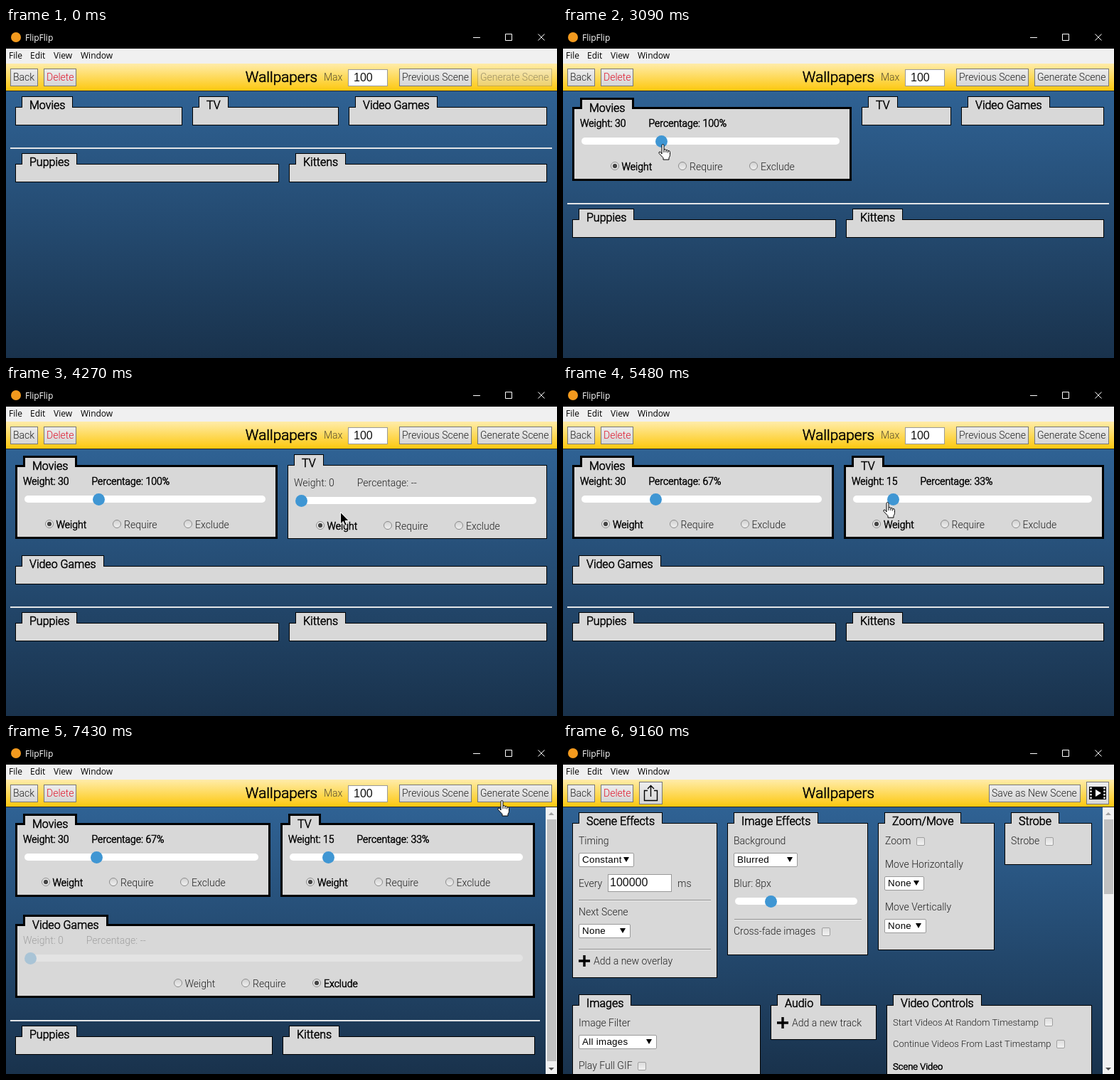
An HTML page for the animation above (9.21 s loop, 775 px wide and 464 px high).

```html
<!DOCTYPE html>
<html lang="en">
<head>
<meta charset="utf-8">
<title>Scene generator</title>
<style>
html, body { margin: 0; width: 100%; height: 100%; overflow: hidden; background: #000; }
#stage { position: relative; width: 775px; height: 464px; overflow: hidden; color: #222;
  font: 300 14px/20px Roboto, sans-serif; background: linear-gradient(#2f6294 89px, #19324c); }
#stage div, #stage svg, #stage span.t { position: absolute; box-sizing: border-box; }
.t { white-space: pre; }
.b { color: #000; -webkit-text-stroke: .6px #000; }
.gap { margin-left: 32px; }
.title { left: 0; width: 775px; text-align: center; font-size: 20.8px; }
.ui { font: 12px/20px "Open Sans", "Noto Sans", sans-serif; color: #000; }
.arial { font: 16px/20px "Liberation Sans", Arial, sans-serif; color: #111; }
.pick { font: 13.33px/18px "Liberation Sans", Arial, sans-serif; color: #000; letter-spacing: .3px;
  padding-left: 4px; background: #fff; border: 1px solid #9a9a9a; border-radius: 2px; }
.pick i { position: absolute; right: 6px; top: 5px; width: 8px; height: 7px; background: #000;
  clip-path: polygon(0 0, 100% 0, 50% 100%); }
.bar { left: 0; top: 50px; width: 775px; height: 39px; border-bottom: 1px solid #2a2a2a;
  background: linear-gradient(#ffecaa, #fdc80f); }
.btn { background: linear-gradient(#ededed, #d6d6d6); border: 1px solid #777; }
.field { background: #fff; border: 1px solid #999; }
.box, .tab { background: #d8d8d8; border: 1px solid #000; }
.tab { left: 8px; top: -16px; height: 16px; padding: 2px 10px 0; border-bottom: 0;
  font-size: 16px; line-height: 19px; white-space: pre; }
.thick, .thick .tab { border-width: 3px; }
.track { height: 10px; border-radius: 5px; background: #fff; }
.knob { width: 17px; height: 17px; border-radius: 50%; background: #3f96d3; }
.radio { width: 12px; height: 12px; border: 1px solid #8c8c8c; border-radius: 50%;
  background: linear-gradient(#d2d2d2, #f0f0f0); }
.on { background: radial-gradient(#444 0 2.8px, #e4e4e4 3.5px); }
.check { width: 12px; height: 12px; border: 1px solid #a0a0a0; border-radius: 2px;
  background: linear-gradient(#ddd, #f2f2f2); }
.faded { opacity: .3; }
</style>
</head>
<body>
<div id="stage">
  <div id="view"></div>
  <div id="cursor" style="left:0;top:0">
    <svg id="arrow" width="14" height="21" viewBox="0 0 14 21"><path d="M.5 .5V17l3.8-3.6 2.5 6 2.6-1.1-2.5-5.8h5.3z" fill="#000" stroke="#fff"/></svg>
    <svg id="hand" style="left:-6px" width="18" height="23" viewBox="0 0 18 23"><path d="M5 14V2.5q0-2 1.5-2t1.5 2V8q2.7-1.3 3 .8 2.4-1 2.7.9 2.8-.7 2.8 1.8v4q0 2-1.5 4v2.6H7v-2.5L1.2 13.4q-1-2 1-2.4 1.3 0 2.8 3zM8 8v4M11 9v3M13.7 10v2.500" fill="#fff" stroke="#000"/></svg>
  </div>
</div>
<script>
const LOOP = 9210, STEP = 60;
const OPEN_MOVIES = 910, SLIDE = 1690, RELEASE = 3090, OPEN_TV = 3800, SET_TV = 4510,
  OPEN_GAMES = 6190, EXCLUDE = 7010, GENERATE = 8190;

// start, steps, x, y, hand at the end
const moves = [
  [430, 6, 60, 120, 1], [OPEN_MOVIES, 11, 127, 158, 0], [SLIDE, 6, 146, 163, 1],
  [2360, 5, 139, 163, 1], [RELEASE, 10, 440, 118, 1], [OPEN_TV, 8, 470, 177, 0],
  [4330, 7, 464, 161, 1], [5370, 12, 58, 253, 1], [OPEN_GAMES, 12, 439, 337, 1],
  [EXCLUDE, 8, 697, 79, 1], [7490, 7, 700, 74, 1], [8620, 9, 795, 110, 0]
];

// from, then left and width of Movies, TV and Video Games
const layouts = [
  [0, 13, 235, 262, 206, 482, 279], [OPEN_MOVIES, 13, 390, 417, 128, 559, 202],
  [SLIDE, 13, 393, 420, 126, 560, 201], [OPEN_TV, 13, 369, 396, 365, 13, 748],
  [SET_TV, 13, 368, 395, 366, 13, 748], [OPEN_GAMES, 13, 359, 386, 358, 13, 731]
];

const $ = id => document.getElementById(id);
const ease = p => p < .5 ? 4 * p ** 3 : 1 - 4 * (1 - p) ** 3;
const el = (cls, x, y, w, h, inner = "", style = "") =>
  `<div class="${cls}" style="left:${x}px;top:${y}px;width:${w}px;height:${h}px;${style}">${inner}</div>`;
const text = (x, y, s, cls = "", style = "") =>
  `<span class="t ${cls}" style="left:${x}px;top:${y - 10}px;${style}">${s}</span>`;
const svg = (x, y, w, h, body) =>
  `<svg style="left:${x}px;top:${y}px" width="${w}" height="${h}" fill="none" stroke="#000">${body}</svg>`;
const fill = (x, y, w, h, color) => el("", x, y, w, h, "", `background:${color}`);

const button = (x, w, s, style = "") =>
  el("btn", x, 57, w, 25, "", style) + text(x + 4, 69, s, "", style);
const box = (x, y, w, h, name, thick) =>
  el("box" + (thick ? " thick" : ""), x, y, w, h, `<div class="tab b">${name}</div>`);
const slider = (x, y, w, part) =>
  el("track", x, y - 5, w, 10) + el("knob", x + 8 + part * (w - 16) - 8.5, y - 8.5, 17, 17);
const check = (x, y) => el("check", x - 6, y - 6, 12, 12);
const pick = (x, y, w, s) => el("pick", x, y, w, 20, s + "<i></i>");
const rule = (x, y, w) => fill(x, y, w, 1, "#8e8e8e") + fill(x, y + 1, w, 1, "#eee");
const plus = (x, y) => svg(x - 8, y - 8, 16, 16, `<path d="M8 0V16M0 8H16" stroke-width="3.400"/>`);

function chrome() {
  return fill(0, 0, 775, 29, "#000") + el("", 7, 6, 14, 14, "", "border-radius:50%;background:#f39a1e") +
    text(27, 14, "FlipFlip", "ui", "color:#fff") +
    svg(650, 5, 115, 17, `<path d="M7 8.500H17M52.500 3.500h9v9h-9zM98.500 3.500l9 9m0-9l-9 9" stroke="#fff"/>`) +
    fill(0, 29, 775, 21, "#f0f0f0") +
    [[4, "File"], [34, "Edit"], [67, "View"], [105, "Window"]].map(([x, s]) => text(x, 39, s, "ui")).join("") +
    `<div class="bar"></div>` + button(6, 39, "Back") + button(53, 46, "Delete", "color:#e0182d") +
    `<div class="title b" style="top:59px">Wallpapers</div>`;
}

function scrollbar(h) {
  return fill(759, 89, 16, 375, "#f1f1f1") + fill(761, 106, 13, h, "#c1c1c1") +
    svg(759, 89, 16, 375, `<path d="M4 11l4-4 4 4z" fill="#a3a3a3" stroke="none"/><path d="M4 366l4 4 4-4z" fill="#505050" stroke="none"/>`);
}

// mode: 0 weight, 2 exclude
function weightGroup(x, y, w, name, { open, weight = 0, percent = "--", mode = 0 }) {
  const thick = weight > 0 || mode > 0, d = thick ? 2 : 0;
  let out = box(x, y, w, open ? 104 : 26, name, thick);
  if (!open) return out;
  const values = text(x + 9 + d, y + 25 - d,
    `Weight: ${weight}<span class="gap">Percentage: ${percent}</span>`, weight ? "b" : "") +
    slider(x + 11 + d, y + 50 - d, w - 26 - 2 * d, weight / 100);
  out += mode ? `<div class="faded" style="left:0;top:0">${values}</div>` : values;
  const mid = x + w / 2;
  [[-137, "Weight"], [-41.5, "Require"], [58.5, "Exclude"]].forEach(([dx, s], i) => {
    const on = i === mode;
    out += el("radio" + (on ? " on" : ""), Math.round(mid + dx - 6), y + 79 - d, 12, 12) +
      text(mid + dx + 10, y + 86 - d, s, on ? "b" : "");
  });
  return out;
}

function generator(t, cx) {
  const [, mx, mw, tx, tw, gx, gw] = layouts.findLast(l => t >= l[0]);
  const tvSet = t >= SET_TV, scroll = t >= OPEN_GAMES, wrapped = t >= OPEN_TV;
  const weight = t < SLIDE ? 0 : t < RELEASE ? Math.round((cx - 34) / 3.47) : 30;
  const hr = scroll ? 389 : wrapped ? 311 : t >= OPEN_MOVIES ? 247 : 169;
  return chrome() + text(447, 69, "Max", "", "opacity:.75") + el("field", 481, 58, 56, 24) +
    text(489, 70, "100", "arial") + button(553, 102, "Previous Scene") +
    button(663, 105, "Generate Scene", weight ? "" : "opacity:.4") +
    weightGroup(mx, 111, mw, "Movies",
      { open: t >= OPEN_MOVIES, weight, percent: weight ? (tvSet ? "67%" : "100%") : "--" }) +
    weightGroup(tx, 111, tw, "TV",
      { open: wrapped, weight: tvSet ? 15 : 0, percent: tvSet ? "33%" : "--" }) +
    weightGroup(gx, wrapped ? 253 : 111, gw, "Video Games", { open: scroll, mode: t >= EXCLUDE ? 2 : 0 }) +
    fill(6, hr - 1, scroll ? 745 : 762, 2, "#e4e6e8") +
    box(13, hr + 22, scroll ? 362 : 371, 26, "Puppies") +
    box(scroll ? 389 : 398, hr + 22, scroll ? 355 : 363, 26, "Kittens") +
    (scroll ? scrollbar(340) : "");
}

function scene() {
  const small = "font-size:13px";
  return chrome() + el("btn", 107, 53, 33, 32) +
    svg(107, 53, 33, 32, `<path d="M12 12.500H7.500v14h18v-14H21M16.500 21V5.500M12 10l4.500-4.500L21 10" stroke-width="1.400"/>`) +
    button(599, 129, "Save as New Scene") + el("btn", 736, 53, 32, 32) +
    svg(736, 53, 32, 32, `<path d="M4 7H28V25H4z" fill="#000" stroke="none"/><path d="M6.500 8V25M25.500 8V25" stroke="#eee" stroke-width="2.500" stroke-dasharray="2.500 2"/><path d="M10 9H22V23H10z" fill="#000" stroke="none"/><path d="M13 11l8 5-8 5z" fill="#fff" stroke="none"/>`) +
    box(13, 111, 204, 218, "Scene Effects") + text(22, 136, "Timing") + pick(22, 153, 78, "Constant") +
    text(22, 196, "Every") + el("field", 63, 183, 90, 25) + text(66, 195, "100000", "arial") + text(161, 196, "ms") +
    rule(22, 219, 186) + text(22, 236, "Next Scene") + pick(22, 253, 73, "None") +
    rule(22, 288, 186) + plus(30, 305) + text(43, 305, "Add a new overlay") +
    box(231, 111, 198, 186, "Image Effects") + text(240, 136, "Background") + pick(240, 153, 90, "Blurred") +
    text(240, 196, "Blur: 8px") + slider(242, 221, 172, .27) + rule(241, 246, 179) +
    text(240, 263, "Cross-fade images") + check(370, 264) +
    box(443, 111, 164, 179, "Zoom/Move") + text(453, 136, "Zoom") + check(503, 137) +
    text(453, 169, "Move Horizontally") + pick(452, 186, 56, "None") +
    text(453, 229, "Move Vertically") + pick(452, 246, 59, "None") +
    box(621, 111, 123, 59, "Strobe") + text(630, 136, "Strobe") + check(684, 137) +
    box(13, 367, 265, 120, "Images") + text(22, 392, "Image Filter") + pick(22, 409, 110, "All images") +
    text(22, 452, "Play Full GIF") + check(111, 453) +
    box(292, 367, 149, 49, "Audio") + plus(309, 392) + text(322, 392, "Add a new track") +
    box(455, 367, 289, 120, "Video Controls") +
    text(464, 392, "Start Videos At Random Timestamp", "", small) + check(683, 391) +
    text(464, 422, "Continue Videos From Last Timestamp", "", small) + check(700, 422) +
    text(464, 454, "Scene Video", "b", small) + scrollbar(105);
}

function pointer(t) {
  let from = [0, 0, -14, 140, 0], to = from;
  for (const m of moves) if (t >= m[0]) [from, to] = [to, m];
  if (to === from) return { x: -40, y: 140, hand: 0 };
  const p = ease(Math.min(1, (Math.floor((t - to[0]) / STEP) + 1) / to[1]));
  const x = from[2] + (to[2] - from[2]) * p, y = from[3] + (to[3] - from[3]) * p;
  const near = m => m[4] && Math.hypot(x - m[2], y - m[3]) < 20;
  return { x, y, hand: near(to) || (p < 1 && near(from)) };
}

let shown = "";
function draw(t) {
  const c = pointer(t);
  const html = t < GENERATE ? generator(t, c.x) : scene();
  if (html !== shown) $("view").innerHTML = shown = html;
  $("cursor").style.transform = `translate(${Math.round(c.x)}px, ${Math.round(c.y)}px)`;
  $("hand").style.display = c.hand ? "" : "none";
  $("arrow").style.display = c.hand ? "none" : "";
}

const start = performance.now();
function tick() {
  draw((performance.now() - start) % LOOP);
  requestAnimationFrame(tick);
}
tick();
</script>
</body>
</html>
```
